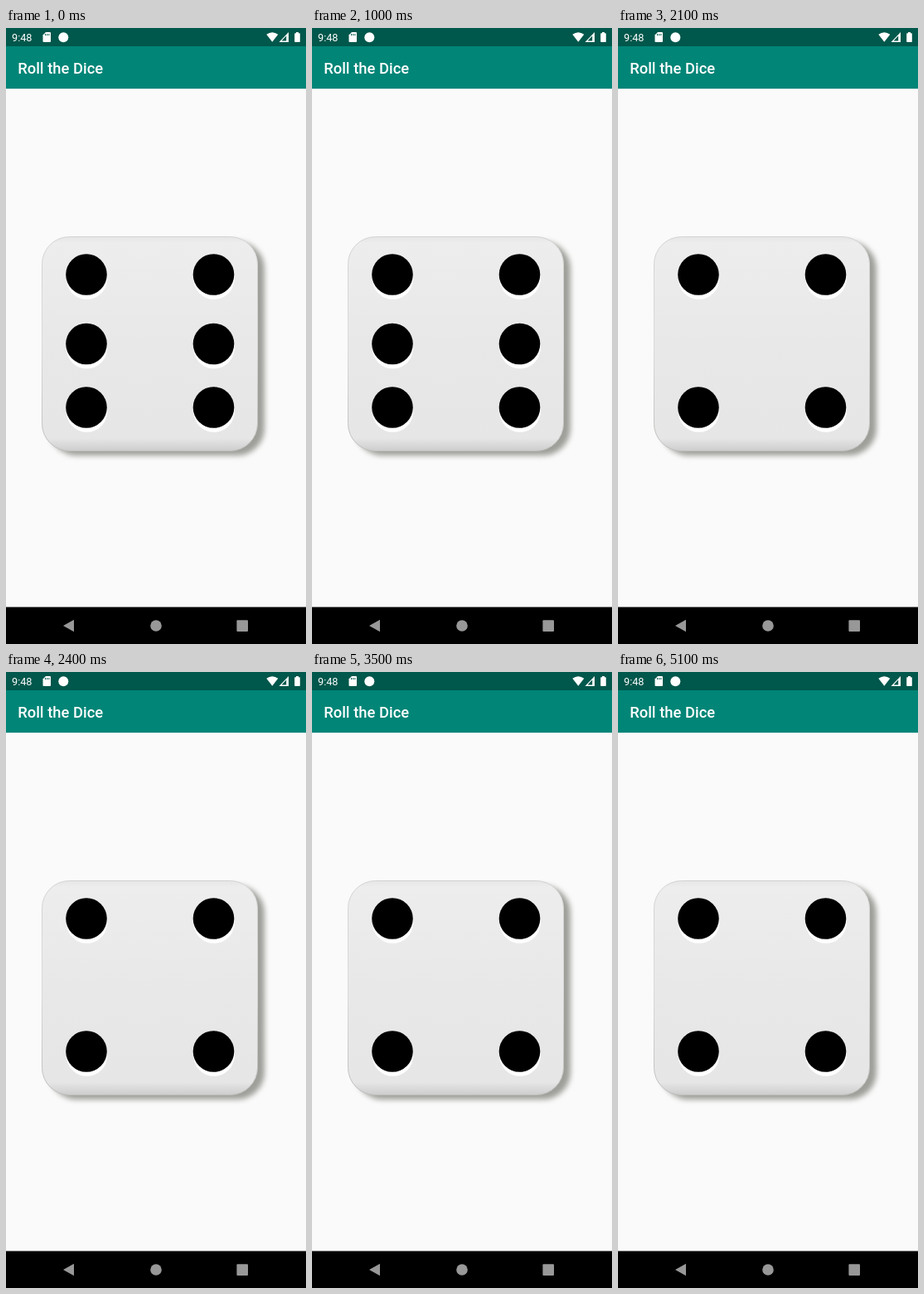
Write an HTML page that moves like this. It is 362 px wide and 742 px high and loops after 5200 ms.

```html
<!DOCTYPE html>
<html lang="en">
<head>
<meta charset="utf-8">
<title>Roll the Dice</title>
<style>
  html, body { margin: 0; width: 100%; height: 100%; overflow: hidden; background: #fafafa; }
  svg { display: block; width: 100vw; height: 100vh; }
  text { font-family: Roboto, sans-serif; fill: #fff; }
</style>
</head>
<body>
<svg viewBox="0 0 362 742" xmlns="http://www.w3.org/2000/svg">
  <defs>
    <linearGradient id="face" x2="0" y2="1">
      <stop offset="0" stop-color="#e6e6e6"/>
      <stop offset=".03" stop-color="#ededed"/>
      <stop offset=".5" stop-color="#e8e8e8"/>
      <stop offset=".94" stop-color="#e6e6e6"/>
      <stop offset="1" stop-color="#cdcdcd"/>
    </linearGradient>
    <linearGradient id="rim" x2="0" y2="1">
      <stop offset="0" stop-color="#d2d2d2"/>
      <stop offset=".5" stop-color="#dadada"/>
      <stop offset="1" stop-color="#bdbdbb"/>
    </linearGradient>
    <filter id="soft" x="-10%" y="-10%" width="120%" height="120%">
      <feGaussianBlur stdDeviation="3"/>
    </filter>
  </defs>

  <rect width="362" height="742" fill="#fafafa"/>
  <rect y="73" width="362" height="1" fill="#e4eaec"/>
  <rect width="362" height="73" fill="#008577"/>
  <rect width="362" height="22" fill="#00574b"/>

  <!-- status bar -->
  <text x="7" y="15.800" font-size="12.700">9:48</text>
  <g fill="#fff">
    <path d="M48 5h5q1 0 1 1v10q0 1-1 1h-7.500q-1 0-1-1V8.500z"/>
    <circle cx="69.300" cy="11.200" r="6"/>
    <path d="M314.300 7.800q7-5 14 0l-7 8.900z"/>
    <path d="M341 5v12h-11.500zM338.200 9.500l-5.600 6h5.600z" fill-rule="evenodd"/>
    <rect x="348.200" y="6.200" width="6.600" height="10.800" rx=".7"/>
    <rect x="350" y="5" width="3" height="2"/>
  </g>
  <path d="M47.500 7v2.200M49.700 7v2.200M51.900 7v2.200" stroke="#00574b"/>
  <text x="14.200" y="55" font-size="18.400" font-weight="500">Roll the Dice</text>

  <!-- die -->
  <rect x="52" y="257" width="260" height="258" rx="33" fill="#85857f" opacity=".78" filter="url(#soft)"/>
  <rect x="43.500" y="251.500" width="260" height="258" rx="33" fill="url(#face)" stroke="url(#rim)"/>
  <g id="pips"></g>

  <!-- navigation bar -->
  <rect y="697.500" width="362" height="44.500" fill="#000"/>
  <g fill="#989898">
    <path d="M69 720 82 712.700v14.600z"/>
    <circle cx="181" cy="720" r="6.800"/>
    <rect x="278.400" y="713.300" width="13.600" height="13.600" rx="1"/>
  </g>
</svg>
<script>
  const LOOP = 5200;
  const LEFT = 97, RIGHT = 250.5, TOP = 297, MIDDLE = 380.5, BOTTOM = 457;
  const rolls = [
    { at: 0, value: 6 },
    { at: 1300, value: 3 },
    { at: 2000, value: 4 },
    { at: 2800, value: 2 },
    { at: 3400, value: 4 }
  ];
  const pips = document.getElementById('pips');
  let shown = 0;

  const disc = (x, y, fill) => `<circle cx="${x}" cy="${y}" r="24.8" fill="${fill}"/>`;
  const pip = (x, y) => disc(x + 0.5, y + 5, '#fff') + disc(x, y, '#000');

  // Pips come in pairs, plus one in the centre of odd faces.
  function drawFace(value) {
    let out = '';
    if (value % 2) out += pip((LEFT + RIGHT) / 2, MIDDLE);
    if (value > 1) out += pip(RIGHT, TOP) + pip(LEFT, BOTTOM);
    if (value > 3) out += pip(LEFT, TOP) + pip(RIGHT, BOTTOM);
    if (value > 5) out += pip(LEFT, MIDDLE) + pip(RIGHT, MIDDLE);
    return out;
  }

  function render(time) {
    const t = time % LOOP;
    const { value } = rolls.findLast(roll => roll.at <= t);
    if (value === shown) return;
    pips.innerHTML = drawFace(value);
    shown = value;
  }

  function tick() {
    render(performance.now());
    requestAnimationFrame(tick);
  }
  tick();
</script>
</body>
</html>
```
